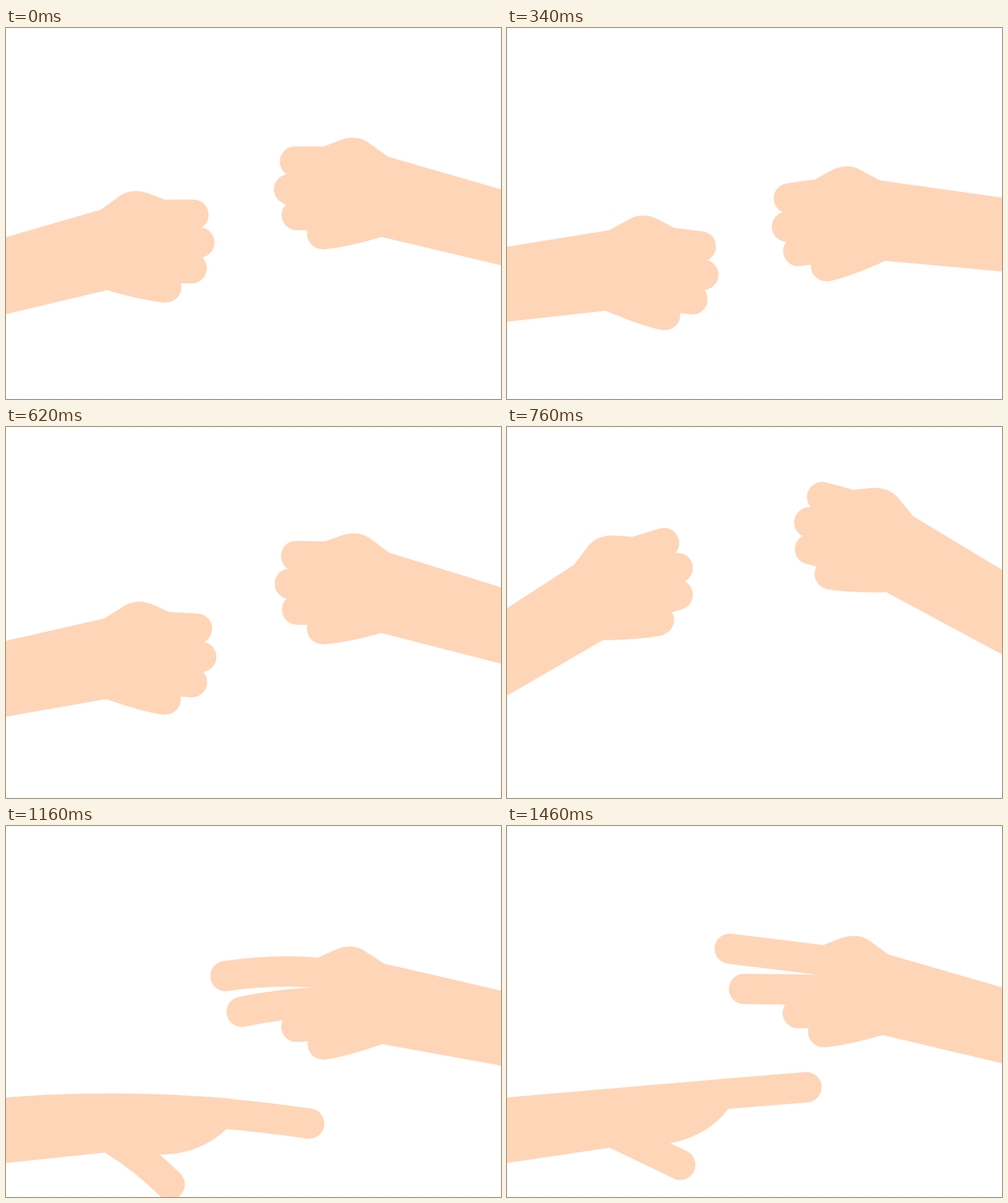
An HTML page with a canvas that plays this animation: 800 px wide and 600 px high, repeating every 1.48 s.

```html
<!DOCTYPE html>
<html lang="en">
<head>
<meta charset="utf-8">
<title>Rock paper scissors</title>
<style>
  html, body { margin: 0; width: 100%; height: 100%; overflow: hidden; background: #fff; }
  canvas { display: block; width: 800px; height: 600px; }
</style>
</head>
<body>
<canvas id="stage" width="800" height="600"></canvas>
<script>
const ctx = document.getElementById('stage').getContext('2d');
const LOOP = 1480, REVEAL = 1080, SKIN = '#ffd5b8';

const sine = u => 0.5 - 0.5 * Math.cos(Math.PI * u);
const cubic = u => u < 0.5 ? 4 * u ** 3 : 1 - 4 * (1 - u) ** 3;

// Tracks are [time, value] steps; angles are degrees of lift.
const rightLift = [[0, 0], [150, 9.1], [368, -8.8], [432, -8.8], [957, 25.4], [1160, -3.1], [1460, 0]];
const leftLift = [[0, 0], [150, 9.1], [420, -8.8], [453, -8.8], [929, 22.2], [1181, -5.4]];
const leftDrop = [[770, 0], [1100, 70]];
const rightBend = [[1080, -1.3], [1160, 1], [1290, -0.2], [1460, 0]];
const leftBend = [[1080, -0.6], [1165, 1], [1300, -0.15], [1460, 0]];

function at(track, t, ease) {
  if (t <= track[0][0]) return track[0][1];
  for (let i = 1; i < track.length; i++) {
    const [t0, a] = track[i - 1], [t1, b] = track[i];
    if (t < t1) return a + (b - a) * ease((t - t0) / (t1 - t0));
  }
  return track[track.length - 1][1];
}

function spin(x, y, deg) {
  ctx.translate(x, y);
  ctx.rotate(deg * Math.PI / 180);
  ctx.translate(-x, -y);
}

// A round-ended finger, bent along a quadratic curve.
function finger(a, c, b) {
  ctx.beginPath();
  ctx.moveTo(...a);
  ctx.quadraticCurveTo(...c, ...b);
  ctx.stroke();
}

const straight = (x0, y0, x1, y1, bend = 0) =>
  finger([x0, y0], [(x0 + x1) / 2, (y0 + y1) / 2], [x1, y1 + bend]);

function through(a, m, b) {
  finger(a, [0, 1].map(i => 2 * m[i] - (a[i] + b[i]) / 2), b);
}

function fist(lift, open, bend) {
  spin(880, 326, lift);
  ctx.beginPath();
  ctx.moveTo(1100, 348);
  ctx.lineTo(617, 208);
  ctx.lineTo(588, 187);
  ctx.bezierCurveTo(575, 177, 559, 175, 541, 181);
  ctx.lineTo(515, 191);
  ctx.lineTo(503, 197);
  ctx.lineTo(500, 333);
  ctx.lineTo(511, 358);
  ctx.quadraticCurveTo(545, 356, 607, 338);
  ctx.lineTo(1100, 455);
  ctx.fill();
  if (open) {
    straight(506, 216.5, 360, 198.5, 16 * bend);
    straight(506, 265, 383, 263.5, 10 * bend);
  } else {
    straight(512, 216, 467, 216);
    straight(510, 261, 457.5, 261);
  }
  straight(505, 302.5, 470, 302.5);
  straight(515, 333, 511, 333);
}

function palm(lift, bend) {
  const warp = (x, y) => {
    const s = Math.max(x, 0);
    const slope = s && 0.01 + 0.00047 * s;
    return [x - bend * slope * (y - 448), y + bend * (0.01 * s + 0.000235 * s * s)];
  };
  spin(-110, 481, -lift);
  ctx.beginPath();
  for (let x = -300; x <= 360; x += 20) ctx.lineTo(...warp(x, 439 - x * 0.0861));
  ctx.lineTo(...warp(358, 457));
  ctx.quadraticCurveTo(...warp(325, 501), ...warp(264, 513));
  ctx.lineTo(...warp(168, 520));
  ctx.lineTo(0, 545);
  ctx.lineTo(-300, 590);
  ctx.fill();
  through(warp(350, 433.5), warp(417, 428), warp(484, 422.5));
  through(warp(179, 499.5), warp(229.5, 523.5 + 3 * bend), warp(280, 548 + 11 * bend));
}

function draw(t) {
  const open = t >= REVEAL;
  const lift = at(leftLift, t, cubic), drop = at(leftDrop, t, sine);
  ctx.fillStyle = '#fff';
  ctx.fillRect(0, 0, 800, 600);
  ctx.fillStyle = ctx.strokeStyle = SKIN;
  ctx.lineWidth = 49;
  ctx.lineCap = 'round';

  ctx.save();
  fist(at(rightLift, t, sine), open, at(rightBend, t, sine));
  ctx.restore();

  ctx.save();
  if (open) {
    ctx.translate(0, drop - 70);
    palm(lift + 5.4, at(leftBend, t, sine));
  } else {
    ctx.translate(770, 86 + drop);
    ctx.scale(-1, 1);
    fist(lift, false, 0);
  }
  ctx.restore();
}

const start = performance.now();
function tick() {
  draw((performance.now() - start) % LOOP);
  requestAnimationFrame(tick);
}
tick();
</script>
</body>
</html>
```
